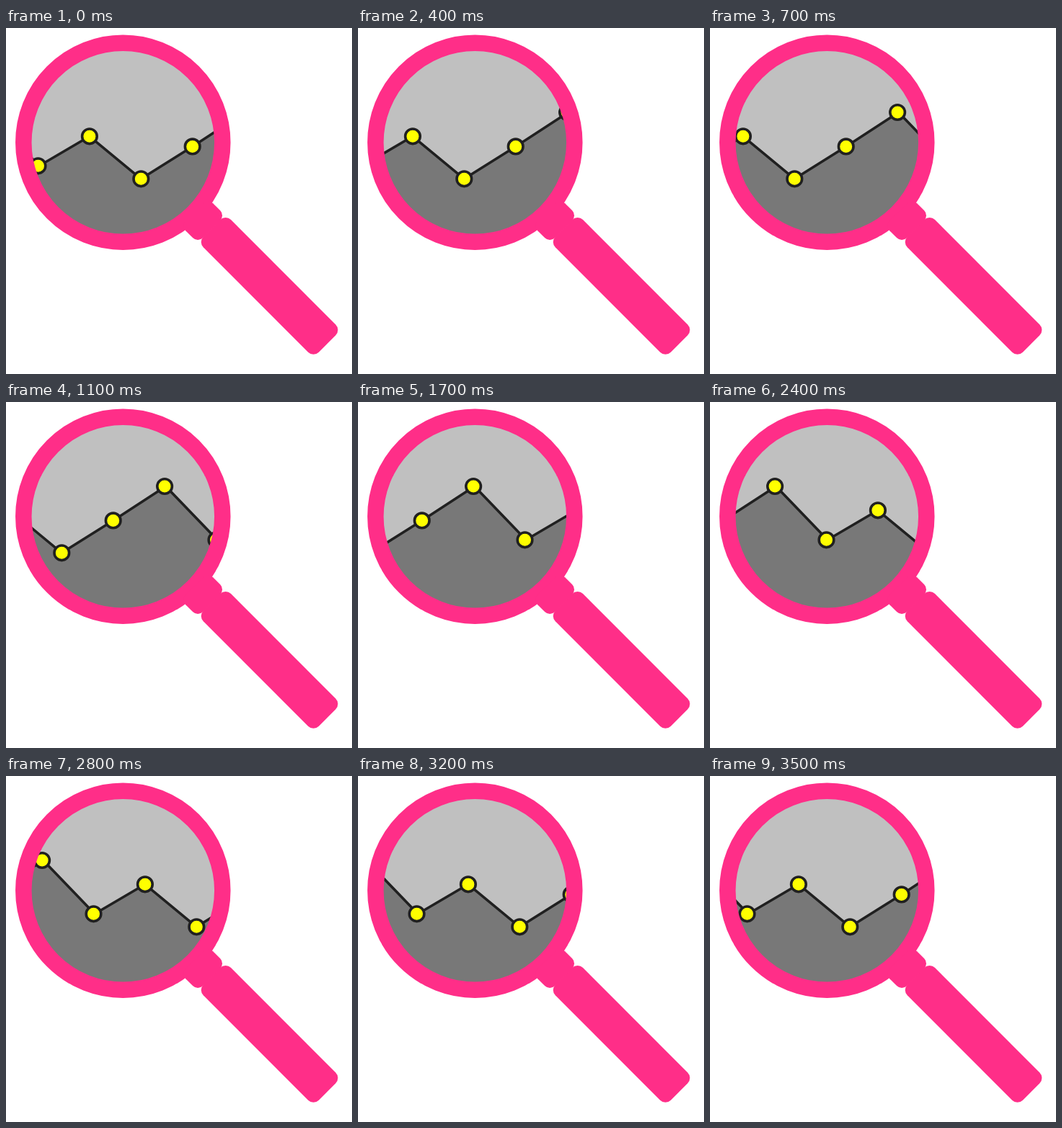
Animation of 480x480 px, one loop 3600 ms. Source, as an HTML page:

```html
<!DOCTYPE html>
<html lang="en">
<head>
<meta charset="utf-8">
<title>Chart under a magnifier</title>
<style>
html, body { margin: 0; width: 100%; height: 100%; overflow: hidden; background: #fff; }
svg { display: block; width: 100vw; height: 100vh; }
</style>
</head>
<body>
<svg viewBox="0 0 480 480">
  <clipPath id="lens"><circle cx="162.3" cy="158.8" r="128"/></clipPath>
  <g clip-path="url(#lens)">
    <rect width="320" height="320" fill="#c0c0c0"/>
    <g id="chart" stroke="#202020" stroke-width="3.6">
      <path id="area" fill="#787878" stroke-linejoin="round"/>
    </g>
  </g>
  <g fill="#ff2e88">
    <circle cx="162.3" cy="158.8" r="138" fill="none" stroke="#ff2e88" stroke-width="22.5"/>
    <g transform="rotate(45)">
      <rect x="365" y="-31.1" width="34" height="53.7" rx="10"/>
      <rect x="398.3" y="-32.5" width="226.5" height="54.1" rx="10.5"/>
    </g>
  </g>
</svg>
<script>
const LOOP = 3600, STEP = 100, SPEED = 10, GAP = 71.4, START = 44.5;
const heights = [191.3, 150.3, 209.3, 164.4, 117];
const nudge = [1.5, 0, 0, 0, 1.5]; // line joints sit slightly right of these dots
const chart = document.getElementById('chart');

let line = '';
for (let i = -2; i < 11; i++) {
  const k = (i + 5) % 5, x = START + i * GAP, y = heights[k];
  line += `L${x + nudge[k]} ${y}`;
  const dot = document.createElementNS('http://www.w3.org/2000/svg', 'circle');
  dot.setAttribute('cx', x);
  dot.setAttribute('cy', y);
  dot.setAttribute('r', 10.3);
  dot.setAttribute('fill', '#ffff00');
  chart.append(dot);
}
document.getElementById('area').setAttribute('d', `M-150 400${line}V400Z`);

function draw() {
  const step = Math.floor(performance.now() % LOOP / STEP);
  chart.setAttribute('transform', `translate(${-step * SPEED})`);
  requestAnimationFrame(draw);
}
draw();
</script>
</body>
</html>
```
